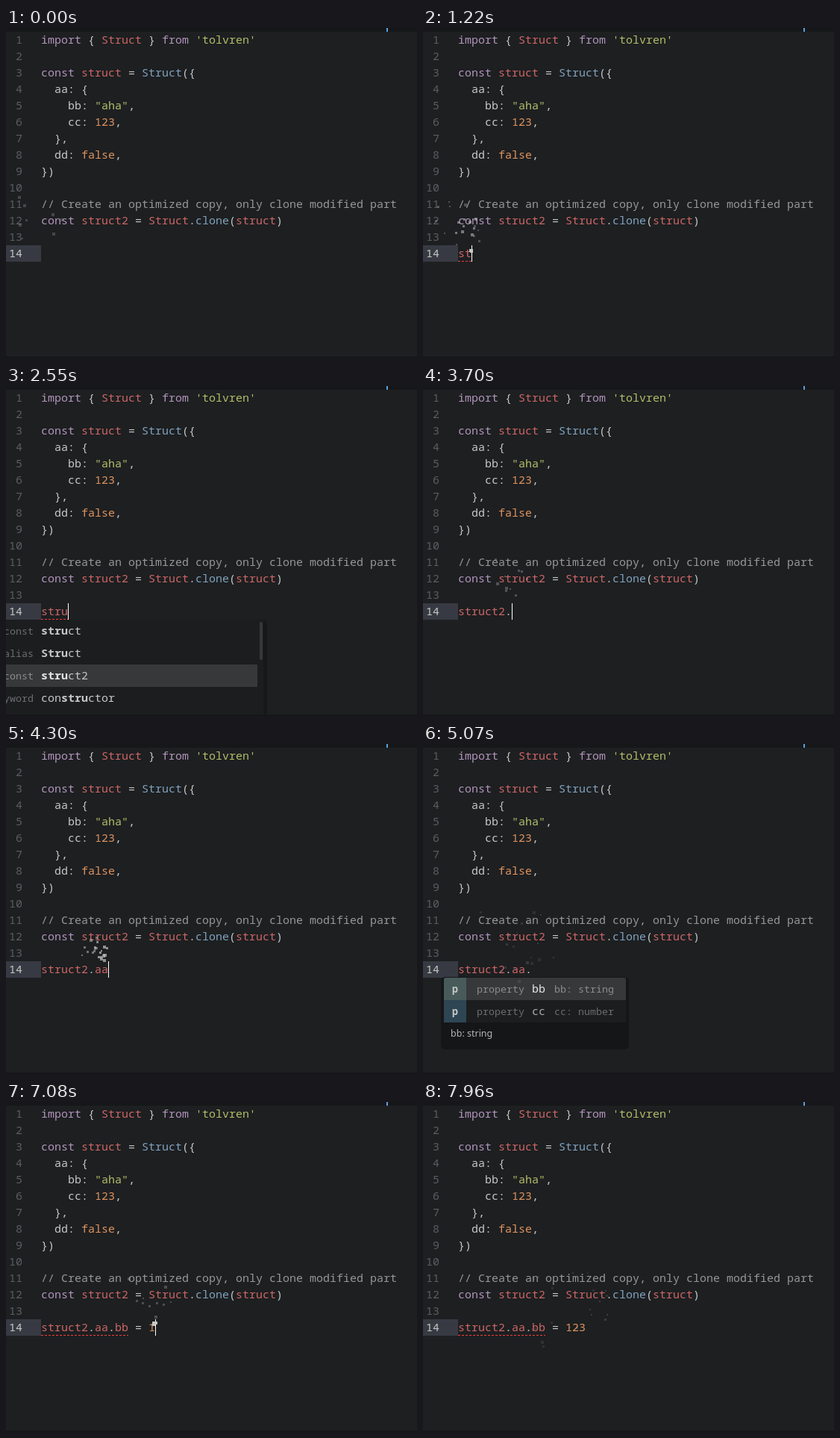
These frames come from a looping animation (551 by 442 pixels, 8000 ms). An HTML page with a canvas:

```html
<!DOCTYPE html>
<html lang="en">
<head>
<meta charset="utf-8">
<title>Typing in an editor</title>
<style>
html, body { margin: 0; width: 551px; height: 442px; overflow: hidden; background: #1d1f21; }
canvas { display: block; }
</style>
</head>
<body>
<canvas id="stage" width="551" height="442"></canvas>
<script>
const ctx = document.getElementById('stage').getContext('2d', { alpha: false });
const LOOP = 8000, FRAME = 1000 / 60, LAG = 40;
const LEFT = 47, CELL = 9, ROW = 22, TOP = 5, EDIT_Y = 291;
const MONO = '"Noto Sans Mono", "DejaVu Sans Mono", monospace';
const SANS = '"Noto Sans", "Open Sans", sans-serif';
const CODE_FONT = '300 15px ' + MONO, BOLD_FONT = 'bold 15px ' + MONO;
const SMALL_FONT = '300 13.333px ' + MONO, ICON_FONT = 'bold 13.333px ' + MONO;

const INK = {
  w: '#c5c8c6', p: '#b294bb', r: '#cc6666', b: '#81a2be',
  g: '#b5bd68', o: '#de935f', c: '#969896'
};

// Each piece is a colour key, a colon and its text.
const CODE = [
  ['p:import', 'w: { ', 'r:Struct', 'w: } ', 'p:from', "g: 'tolvren'"],
  [],
  ['p:const', 'r: struct', 'w: = ', 'b:Struct', 'w:({'],
  ['w:  aa: {'],
  ['w:    bb: ', 'g:"aha"', 'w:,'],
  ['w:    cc: ', 'o:123', 'w:,'],
  ['w:  },'],
  ['w:  dd: ', 'o:false', 'w:,'],
  ['w:})'],
  [],
  ['c:// Create an optimized copy, only clone modified part'],
  ['p:const', 'r: struct2', 'w: = ', 'b:', 'r:Struct', 'w:.', 'b:clone', 'w:(', 'r:struct', 'w:)']
];

// The edited line: when each piece of input appears.
const KEYS = [
  [-550, ''], [770, 's'], [1000, 't'], [1240, 'r'], [1480, 'u'], [2820, 'ct2'],
  [3250, '.'], [4060, 'a'], [4180, 'a'], [4350, '.'], [5340, 'b'], [5460, 'b'],
  [5640, ' '], [5775, '='], [5895, ' '], [6600, '1'], [7085, '2'], [7290, '3']
];

function randomizer(seed) {
  return () => {
    seed = (seed * 1664525 + 1013904223) >>> 0;
    return seed / 4294967296;
  };
}

const states = [], sparks = [];

// Sparks fly up from where the cursor stood just before the key.
function burst(start, x) {
  const rnd = randomizer(start * 7 + 9001);
  for (let i = 8 + Math.floor(rnd() * 5); i > 0; i--) {
    sparks.push({
      start, x,
      vx: rnd() * 2 - 1,
      vy: rnd() * 2 - 3.5,
      size: 2 + Math.round(rnd() * 2)
    });
  }
}

let line = '';
for (const [time, input] of KEYS) {
  if (input.length < 2) burst(time - LAG, LEFT + line.length * CELL);
  line += input;
  states.push({ time, line });
}

function box(x, y, w, h, color) {
  ctx.fillStyle = color;
  ctx.fillRect(x, y, w, h);
}

function panel(x, y, w, h, r, color) {
  ctx.fillStyle = color;
  ctx.beginPath();
  ctx.roundRect(x, y, w, h, r);
  ctx.fill();
}

function text(str, x, y, color, font = CODE_FONT, align = 'left') {
  ctx.font = font;
  ctx.textAlign = align;
  ctx.fillStyle = color;
  ctx.fillText(str, x, y);
}

function codeLine(parts, row) {
  let x = LEFT;
  for (const part of parts) {
    const str = part.slice(2);
    text(str, x, TOP + row * ROW + 16, INK[part[0]]);
    x += str.length * CELL;
  }
}

function drawEditor() {
  box(0, 0, 551, 442, '#1d1f21');
  box(0, 0, 551, 5, '#161719');
  box(510, 0, 2, 5, '#5a9fe0');
  box(0, 440, 551, 2, '#161719');
  box(0, EDIT_Y, LEFT, ROW, '#373a42');
  for (let i = 1; i <= 14; i++) {
    text(i, 22, TOP + i * ROW - 6, i === 14 ? INK.w : '#5b5e60', CODE_FONT, 'right');
  }
  CODE.forEach(codeLine);
}

function underline(from, to) {
  const end = LEFT + to * CELL;
  for (let x = LEFT + from * CELL; x < end; x += 5) {
    box(x, 312, Math.min(3, end - x), 1, '#ff3d3d');
  }
}

function drawEdit(t) {
  const { time, line } = states.filter(s => s.time <= t).pop();
  const parts = line.match(/[a-z]+2?|\d+|[^a-z\d]+/g) || [];
  codeLine(parts.map(s => (/^[a-z]/.test(s) ? 'r:' : /^\d/.test(s) ? 'o:' : 'w:') + s), 13);

  if (t > 1000 && t < 2820) underline(0, line.length);
  if (t > 5775 && t < 6600) underline(11, line.length);
  if (t >= 6600) underline(0, 13);

  const idle = t - time;
  if (idle < 500 || Math.floor((idle - 500) / 400) % 2) {
    box(LEFT + line.length * CELL, EDIT_Y, 1, ROW, '#ffffff');
  }
}

function drawWords(t) {
  const picked = t < 2460 ? 0 : t < 2550 ? 1 : 2;
  const items = [['const', '', 'stru', 'ct'], ['alias', '', 'Stru', 'ct'],
    ['const', '', 'stru', 'ct2'], ['keyword', 'con', 'stru', 'ctor']];
  panel(-10, 313, 360, 127, [0, 6, 0, 0], '#17181a');
  box(0, 313, 345, 127, '#1c1d1f');
  items.forEach(([kind, head, match, tail], i) => {
    const y = 313 + i * 30, on = i === picked;
    if (on) box(0, y, 337, 30, '#37383a');
    text(kind, 37, y + 20, on ? '#8a8c8d' : '#6b6d6f', SMALL_FONT, 'right');
    text(head, LEFT, y + 20, INK.w);
    const x = LEFT + head.length * CELL;
    text(match, x, y + 20, on ? '#e4e6e5' : INK.w, BOLD_FONT);
    text(tail, x + match.length * CELL, y + 20, INK.w);
  });
  panel(340, 316, 4, 51, 2, '#37383a');
}

function drawProps(x, right, items) {
  const w = right - x;
  panel(x - 4, 312, w + 8, 97, 6, '#151618');
  box(x, 313, w, 60, '#1c1d1f');
  items.forEach(([name, type], i) => {
    const y = 313 + i * 30, on = i === 0;
    const dim = on ? '#8a8c8d' : '#6b6d6f';
    if (on) panel(x, y, w, 30, [3, 3, 0, 0], '#37383a');
    panel(x, y, 30, 30, on ? [3, 0, 0, 0] : 0, on ? '#485a5a' : '#2e4653');
    text('p', x + 15, y + 20, INK.w, ICON_FONT, 'center');
    text('property', x + 44, y + 20, dim, SMALL_FONT);
    text(name, x + 118, y + 20, on ? '#e4e6e5' : '#a9acab');
    text(type, x + 148, y + 20, dim, SMALL_FONT);
  });
  text(items[0][1], x + 9, 392, '#b4b7b5', '12.5px ' + SANS);
}

function drawSparks(t) {
  ctx.fillStyle = INK.w;
  for (const s of sparks) {
    const n = (t - s.start) / FRAME, alpha = 0.96 ** n;
    if (n < 0 || alpha < 0.1) continue;
    ctx.globalAlpha = alpha;
    const x = s.x + s.vx * n, y = 302 + s.vy * n + 0.0375 * n * n;
    ctx.fillRect(Math.round(x - s.size / 2), Math.round(y - s.size / 2), s.size, s.size);
  }
  ctx.globalAlpha = 1;
}

function draw(t) {
  drawEditor();
  drawEdit(t);
  if (t >= 1540 && t < 2820) drawWords(t);
  if (t >= 3780 && t < 4060) {
    drawProps(1, 414, [['aa', 'aa: {bb: string, cc: number}'], ['dd', 'dd: bool']]);
  }
  if (t >= 4870 && t < 5340) {
    drawProps(28, 272, [['bb', 'bb: string'], ['cc', 'cc: number']]);
  }
  drawSparks(t);
}

const begin = performance.now();
function tick() {
  draw((performance.now() - begin) % LOOP);
  requestAnimationFrame(tick);
}
tick();
</script>
</body>
</html>
```
